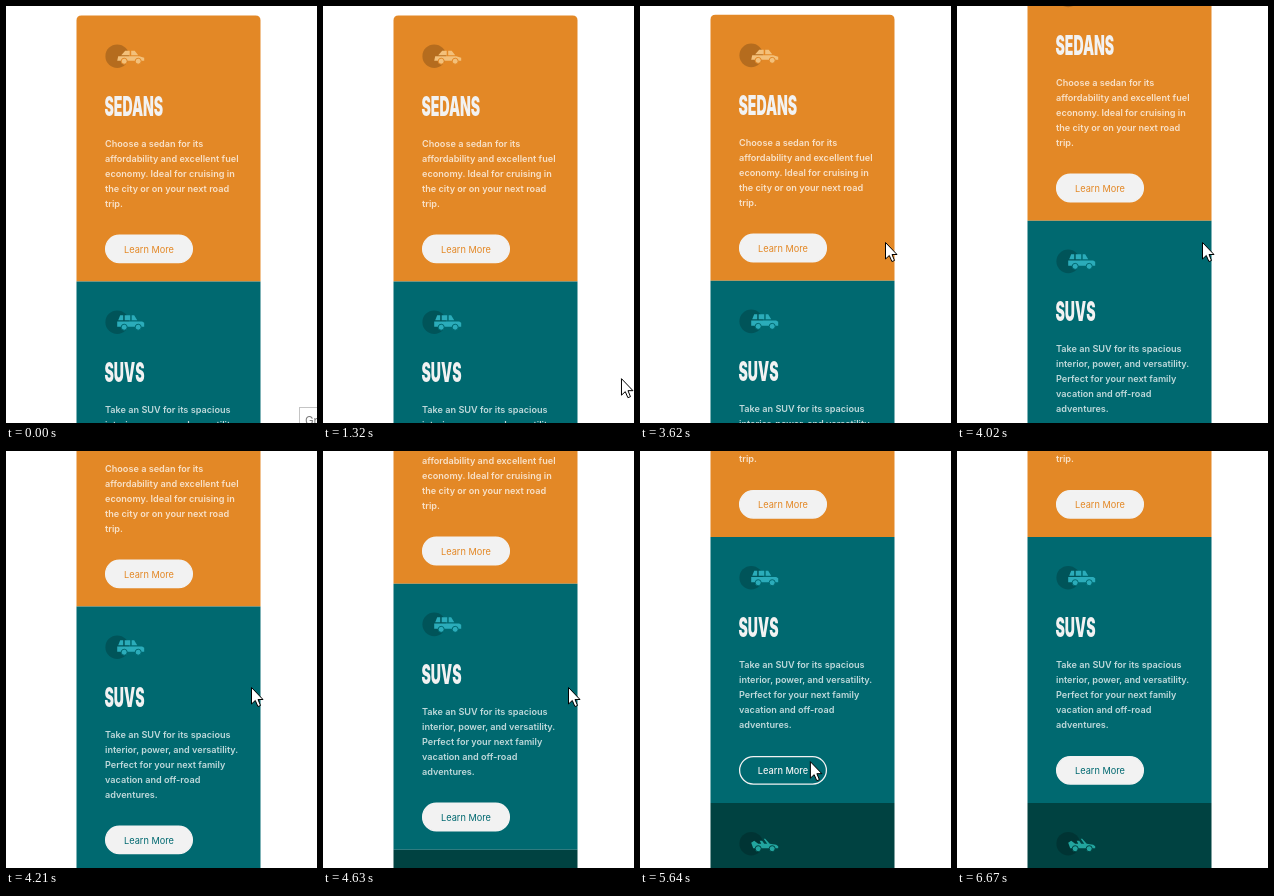
Recreate the animation shown at these times as an HTML page. Size 311 by 417 pixels, loop 8 s.

```html
<!DOCTYPE html>
<html lang="en">
<head>
<meta charset="utf-8">
<title>Car cards</title>
<style>
  html, body { margin: 0; height: 100%; overflow: hidden; background: #fff; }
  svg { display: block; width: 100%; height: 100%; }
  text { font-family: Inter, "Open Sans", sans-serif; }
  .title { font-size: 26.5px; font-weight: 900; fill: #f2f2f2; }
  .copy { font-size: 9.15px; font-weight: 600; fill: #fff; fill-opacity: .75; }
  .button rect { fill: #f2f2f2; stroke: #f2f2f2; stroke-width: 1.3; }
  .button text { font-size: 9.2px; text-anchor: middle; }
  .button.hover rect { fill: none; }
  .button.hover text { fill: #f2f2f2; font-weight: 500; }
</style>
</head>
<body>
<svg viewBox="0 0 311 417">
  <g id="page"></g>
  <g id="tooltip">
    <rect x="293.5" y="401.5" width="40" height="30" fill="#fff" stroke="#c4c4c4"/>
    <text x="299" y="419" font-size="11.5" fill="#777">Gr</text>
  </g>
  <path id="cursor" d="M0 0V16.5L3.8 13 6.4 19 9 18 6.5 12H11.5Z" fill="#fff" stroke="#000"/>
</svg>
<script>
const LOOP = 8000;
const CARD = { x: 70.5, top: 9.5, width: 184, height: 266 };
const BUTTON = { x: 99.6, y: 219.6, width: 86.8, height: 27.5 };
const TITLE_CONDENSE = .53;

const cards = [
  {
    color: '#e38826', carColor: '#f3c07a', title: 'SEDANS',
    lines: ['Choose a sedan for its', 'affordability and excellent fuel',
      'economy. Ideal for cruising in', 'the city or on your next road', 'trip.'],
    car: 'M4-1 8-5.5H12.5V-1Z M14-5.5H17.5L21-1H14Z M0 4.5 1 0H22L27 1.5V4.5Z'
  },
  {
    color: '#006970', carColor: '#2bacba', title: 'SUVS',
    lines: ['Take an SUV for its spacious', 'interior, power, and versatility.',
      'Perfect for your next family', 'vacation and off-road', 'adventures.'],
    car: 'M1-2 3-7H6V-2Z M7.5-7H13V-2H7.5Z M14.5-7H17L20-2H14.5Z M0 4.5V-.8H25L27 .5V4.5Z'
  },
  {
    color: '#004241', carColor: '#22a59f', title: '', lines: [],
    car: 'M0-1 3-3 7 0H10L8.5-3H11L13 0H16L12.5-5H14L18.5 0 25 1 27 2.5V4.5H2Z'
  }
];

function cardMarkup(card, i) {
  const { width, height } = CARD;
  const top = CARD.top + i * height;
  const outline = i ? `M0 0H${width}V${height}H0Z`
    : `M0 5Q0 0 5 0H${width - 5}Q${width} 0 ${width} 5V${height}H0Z`;
  const wheel = x => `<circle cx="${x}" cy="5" r="3" fill="${card.carColor}" stroke="${card.color}"/>`;
  const copy = card.lines.map((line, n) =>
    `<text class="copy" x="99" y="${131.1 + 15 * n}">${line}</text>`).join('');
  const content = card.title && `
    <text class="title" transform="translate(98.5 100) scale(${TITLE_CONDENSE} 1)">${card.title}</text>
    ${copy}
    <g class="button">
      <rect x="${BUTTON.x}" y="${BUTTON.y}" width="${BUTTON.width}" height="${BUTTON.height}" rx="13.75"/>
      <text x="143" y="237.2" fill="${card.color}">Learn More</text>
    </g>`;
  return `<g transform="translate(0 ${top})">
    <path transform="translate(${CARD.x} 0)" d="${outline}" fill="${card.color}"/>
    <g transform="translate(111.2 40.7)">
      <circle r="11.8" fill-opacity=".2"/>
      <path d="${card.car}" fill="${card.carColor}"/>
      ${wheel(7)}${wheel(21)}
    </g>
    ${content}
  </g>`;
}

const page = document.getElementById('page');
const tooltip = document.getElementById('tooltip');
const cursor = document.getElementById('cursor');
page.innerHTML = cards.map(cardMarkup).join('');
const buttons = [...page.querySelectorAll('.button')];

const linear = p => p;
const easeOut = p => 1 - (1 - p) ** 3;
const smooth = p => p * p * (3 - 2 * p);
const wheelEase = p => smooth(Math.min(1, Math.max(0, 1.4 * p - .28)));

// Progress 0..1 in equal held steps; the first step lands at start, the last at end.
function progress(t, start, end, steps) {
  if (t < start) return 0;
  const step = Math.floor((t - start) / (end - start) * (steps - 1) + .15);
  return Math.min(1, (step + 1) / steps);
}

const scrolls = [
  { start: 3620, end: 3820, by: 60 },
  { start: 4020, end: 4210, by: 60 },
  { start: 4560, end: 4760, by: 60 },
  { start: 4960, end: 5160, by: 9.5 }
];
const entry = [306, 417];
const moves = [
  { start: 1110, end: 1870, steps: 12, to: [277, 246], ease: smooth },
  { start: 1940, end: 2420, steps: 8, to: [158, 239], ease: easeOut },
  { start: 2750, end: 3290, steps: 8, to: [245.5, 236.5], ease: smooth },
  { start: 5230, end: 5710, steps: 8, to: [167, 314], ease: smooth },
  { start: 5770, end: 5910, steps: 3, to: [162, 310], ease: linear },
  { start: 6260, end: 6600, steps: 6, to: [293, 303], ease: smooth }
];

const scrollAt = t => scrolls.reduce((sum, s) =>
  sum + s.by * wheelEase(progress(t, s.start, s.end, 4)), 0);

const cursorAt = t => moves.reduce((from, m) => {
  const p = m.ease(progress(t, m.start, m.end, m.steps));
  return from.map((v, i) => v + (m.to[i] - v) * p);
}, entry);

function render(t) {
  const scroll = scrollAt(t);
  const [x, y] = cursorAt(t);
  const cursorShown = t >= 1110 && t < 6670;
  page.setAttribute('transform', `translate(0 ${-scroll})`);
  cursor.setAttribute('transform', `translate(${x} ${y})`);
  cursor.style.display = cursorShown ? '' : 'none';
  tooltip.style.display = t < 70 ? '' : 'none';
  buttons.forEach((button, i) => {
    const dx = x - BUTTON.x;
    const dy = y + scroll - CARD.top - i * CARD.height - BUTTON.y;
    const inside = dx > 0 && dx < BUTTON.width && dy > 0 && dy < BUTTON.height;
    button.classList.toggle('hover', cursorShown && inside);
  });
}

const begin = performance.now();
function tick() {
  render((performance.now() - begin) % LOOP);
  requestAnimationFrame(tick);
}
tick();
</script>
</body>
</html>
```
